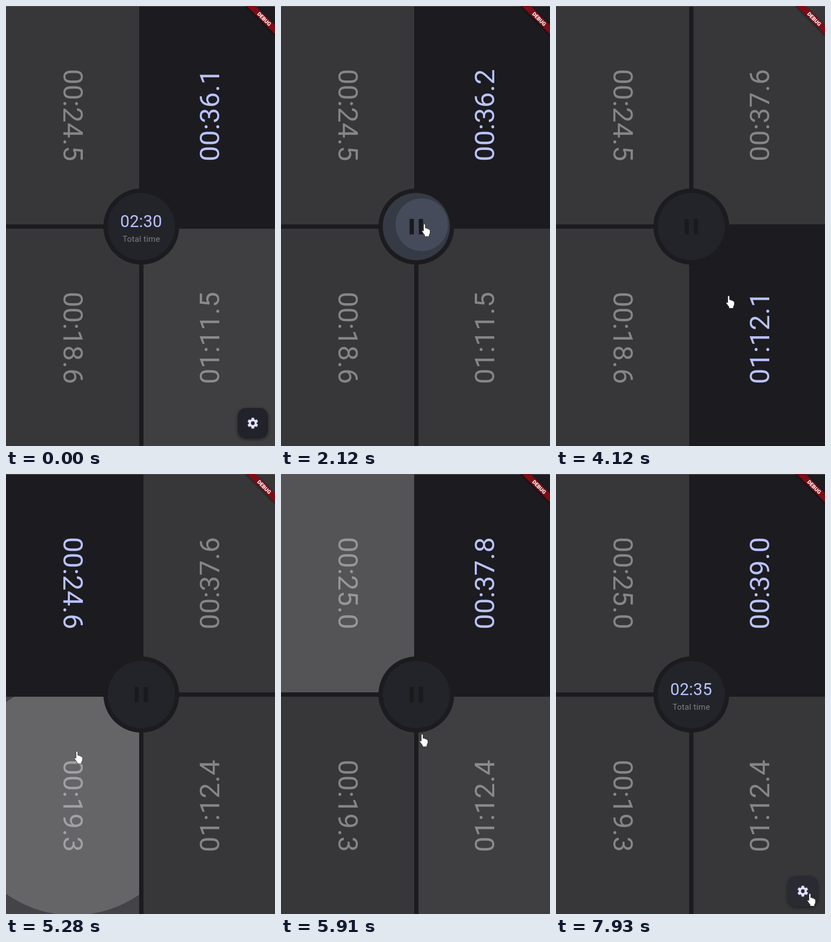
Animation, 497 px wide and 810 px high, one loop 8000 ms. Source, as an HTML page:

```html
<!DOCTYPE html>
<html lang="en">
<head>
<meta charset="utf-8">
<title>Four-player clock</title>
<style>
  html, body { margin: 0; width: 100%; height: 100%; overflow: hidden; background: #1c1b1f; }
  svg { display: block; font-family: Roboto, sans-serif; text-anchor: middle; letter-spacing: .25px; }
  .time { font-size: 50.8px; }
</style>
</head>
<body>
<svg id="stage" width="497" height="810" viewBox="0 0 497 810">
  <defs>
    <filter id="shadow" x="-30%" y="-30%" width="160%" height="160%">
      <feDropShadow dx="0" dy="2" stdDeviation="3" flood-color="#000" flood-opacity=".5"/>
    </filter>
    <clipPath id="clip4"><circle cx="250" cy="406" r="62"/></clipPath>
  </defs>
  <rect width="497" height="810" fill="#1c1b1f"/>
  <g id="cells"></g>
  <rect width="497" height="1" fill="#5c5c5e"/>
  <circle cx="250" cy="406" r="70" fill="#1c1b1f"/>
  <circle cx="250" cy="406" r="62" fill="#222429"/>
  <g id="hub"></g>
  <g id="total">
    <text id="totalTime" x="249.7" y="407" font-size="30.600" fill="#bac3ff"></text>
    <text x="250" y="433.5" font-size="15" fill="#7f7f83">Total time</text>
  </g>
  <path id="pause" d="M237.500 392h8v28.500h-8zM254.500 392h8v28.500h-8z" fill="#1a1a1e"/>
  <g id="gear">
    <rect id="gearBox" x="428" y="740" width="56" height="56" rx="15" filter="url(#shadow)"/>
    <g id="cog" transform="translate(456 768)" fill="#dfe0ff">
      <circle r="5.300" fill="none" stroke="#dfe0ff" stroke-width="3.800"/>
    </g>
  </g>
  <g transform="translate(500 1) rotate(45)">
    <rect x="-50" y="26.600" width="100" height="11.600" fill="#7c1114" filter="url(#shadow)"/>
    <text y="36" font-size="9.800" font-weight="900" letter-spacing="0" fill="#fff">DEBUG</text>
  </g>
  <circle id="press" r="12" fill="#fffa00" fill-opacity=".5"/>
  <path id="hand" fill="#fff" stroke="#222" stroke-width=".8" stroke-linejoin="round"
    d="M-1.700 1.600Q0-1 1.700 1.600V8Q4 7 5 9Q7.500 8.300 8 10.300Q10.500 10 10.500 12.500V16Q10 19 8.700 20.500V23.500H.5V21L-4.600 14Q-5.200 11.300-1.700 13.200Z"/>
</svg>
<script>
const LOOP = 8000, START = 2073, STOP = 7060;
const TL = 0, TR = 1, BL = 2, BR = 3, HUB = 4;
const ACCENT = '#bac3ff';
const $ = id => document.getElementById(id);

function add(parent, tag, attrs) {
  const el = document.createElementNS('http://www.w3.org/2000/svg', tag);
  set(el, attrs);
  parent.appendChild(el);
  return el;
}
function set(el, attrs) {
  for (const name in attrs) el.setAttribute(name, attrs[name]);
}
const show = (el, on) => set(el, { display: on ? 'inline' : 'none' });
const clamp = (v, a, b) => Math.min(b, Math.max(a, v));
const mix = (a, b, k) => a + (b - a) * k;

// Seconds on each clock at the start, and who runs when
const base = [24.56, 36.16, 18.61, 71.56];
const runs = [
  [TR, START, 3570], [BR, 3570, 4450], [BL, 4450, 5210], [TL, 5210, 5700], [TR, 5700, STOP]
];
// lead: how long the pointer was already down when the tap registers
const taps = [
  { cell: HUB, at: START, lead: 0 },
  ...runs.slice(0, 4).map(([cell, , at]) => ({ cell, at, lead: 55 })),
  { cell: HUB, at: STOP, lead: 0 }
];
const pointer = [
  [260, 450, 754], [330, 477, 686], [540, 477, 686], [800, 362, 480], [1020, 402, 333],
  [1220, 402, 327], [1640, 268, 399], [1780, 265, 401], [2120, 265, 401], [2550, 434, 347],
  [2740, 434, 353], [3570, 430, 352], [4120, 319, 533], [4450, 321, 535], [5070, 131, 510],
  [5280, 131, 510], [5560, 162, 285], [5700, 162, 285], [6150, 380, 712], [6570, 337, 491],
  [6900, 268, 400], [7060, 265, 402], [7390, 265, 402], [7600, 380, 680], [7859, 380, 680],
  [7860, 469, 772]
];

function makeCell(i) {
  const hub = i === HUB, right = i % 2, low = i > 1;
  // The right and bottom cells run slightly past the stage
  const box = hub ? { x: 188, y: 344, width: 124, height: 124 }
    : { x: right ? 254 : 0, y: low ? 410 : 0, width: 246, height: 402 };
  const parent = $(hub ? 'hub' : 'cells');
  const cell = { box, cx: box.x + box.width / 2, cy: box.y + box.height / 2 };
  if (!hub) {
    add(add($('stage').querySelector('defs'), 'clipPath', { id: 'clip' + i }), 'rect', box);
    cell.back = add(parent, 'rect', { ...box, fill: '#373739' });
    const turn = right ? -90 : 90;
    cell.text = add(parent, 'text', {
      class: 'time', y: 17.4, transform: `translate(${cell.cx} ${cell.cy}) rotate(${turn})`
    });
  }
  const ink = add(parent, 'g', { 'clip-path': `url(#clip${i})` });
  cell.hover = add(ink, 'rect', { ...box, fill: hub ? ACCENT : '#fff' });
  cell.glow = add(ink, 'rect', { ...box, fill: ACCENT });
  cell.ripple = add(ink, 'circle', { fill: hub ? ACCENT : '#fff' });
  cell.reach = hub ? 92 : 240;
  return cell;
}
const cells = [TL, TR, BL, BR, HUB].map(makeCell);

for (let a = 0; a < 360; a += 60)
  add($('cog'), 'path', { d: 'M-3-6L-2-9.700H2L3-6Z', transform: `rotate(${a})`, stroke: '#dfe0ff', 'stroke-width': .5 });

// cubic-bezier(.25, .1, .25, 1)
function ease(x) {
  let lo = 0, hi = 1;
  const bez = (u, a, b) => 3 * u * (1 - u) ** 2 * a + 3 * u * u * (1 - u) * b + u ** 3;
  for (let n = 0; n < 16; n++) {
    const u = (lo + hi) / 2;
    if (bez(u, .25, .25) < x) lo = u; else hi = u;
  }
  return bez(lo, .1, 1);
}

function pointerAt(t) {
  const next = pointer.findIndex(key => key[0] > t);
  if (next === 0) return pointer[0].slice(1);
  if (next < 0) return pointer[pointer.length - 1].slice(1);
  const [t0, x0, y0] = pointer[next - 1], [t1, x1, y1] = pointer[next];
  const k = (t - t0) / (t1 - t0), s = k * k * (3 - 2 * k);
  return [mix(x0, x1, s), mix(y0, y1, s)];
}

const secondsOf = (cell, t) => runs.reduce(
  (sum, [who, a, b]) => who === cell ? sum + (clamp(t, a, b) - a) / 1000 : sum, base[cell]);
const two = n => String(n).padStart(2, '0');
const clock = s => two(Math.floor(s / 60)) + ':' + two(Math.floor(s % 60));
const tenths = s => clock(s) + '.' + Math.floor(s * 10) % 10;

function cellUnder(x, y) {
  if (Math.hypot(x - 250, y - 406) < 62) return HUB;
  return cells.findIndex(({ box }) =>
    x >= box.x && x < box.x + box.width && y >= box.y && y < box.y + box.height);
}

function drawInk(cell, i, t) {
  const tap = taps.filter(p => p.cell === i && p.at <= t).pop();
  const age = tap ? t - tap.at + tap.lead : Infinity;
  const grow = ease(clamp(age / 225, 0, 1));
  const [x, y] = tap ? pointerAt(tap.at) : [0, 0];
  set(cell.ripple, {
    cx: mix(x, cell.cx, grow), cy: mix(y, cell.cy, grow),
    r: cell.reach * mix(.3, 1, grow),
    opacity: (i === HUB ? .12 : .175) * clamp((375 - age) / 150, 0, 1)
  });
  set(cell.glow, { opacity: .045 * clamp(1 - age / 600, 0, 1) });
}

function draw(t) {
  const running = t >= START && t < STOP;
  const run = runs.find(([, a, b]) => t >= a && t < b);
  const active = run ? run[0] : TR;
  const [x, y] = pointerAt(t);
  const onGear = t >= 7860;
  const under = onGear ? -1 : cellUnder(x, y);

  cells.forEach((cell, i) => {
    const on = i === active;
    if (i !== HUB) {
      show(cell.back, !on);
      cell.text.textContent = tenths(secondsOf(i, t));
      set(cell.text, { fill: on ? ACCENT : '#868688' });
    }
    set(cell.hover, { opacity: i === under && !on ? (i === HUB ? .09 : .04) : 0 });
    drawInk(cell, i, t);
  });

  show($('pause'), running);
  show($('total'), !running);
  show($('gear'), !running);
  $('totalTime').textContent = clock([TL, TR, BL, BR].reduce((sum, i) => sum + secondsOf(i, t), 0));
  set($('gearBox'), { fill: onGear ? '#2a2b32' : '#23242a' });

  const pressed = taps.some(({ at }) => t >= at - 140 && t < at);
  show($('press'), pressed);
  set($('press'), { cx: x, cy: y });
  show($('hand'), t >= 260 && (t < 7600 || onGear));
  set($('hand'), { transform: `translate(${x} ${y})` });
}

const origin = performance.now();
function tick() {
  draw((performance.now() - origin) % LOOP);
  requestAnimationFrame(tick);
}
tick();
</script>
</body>
</html>
```
